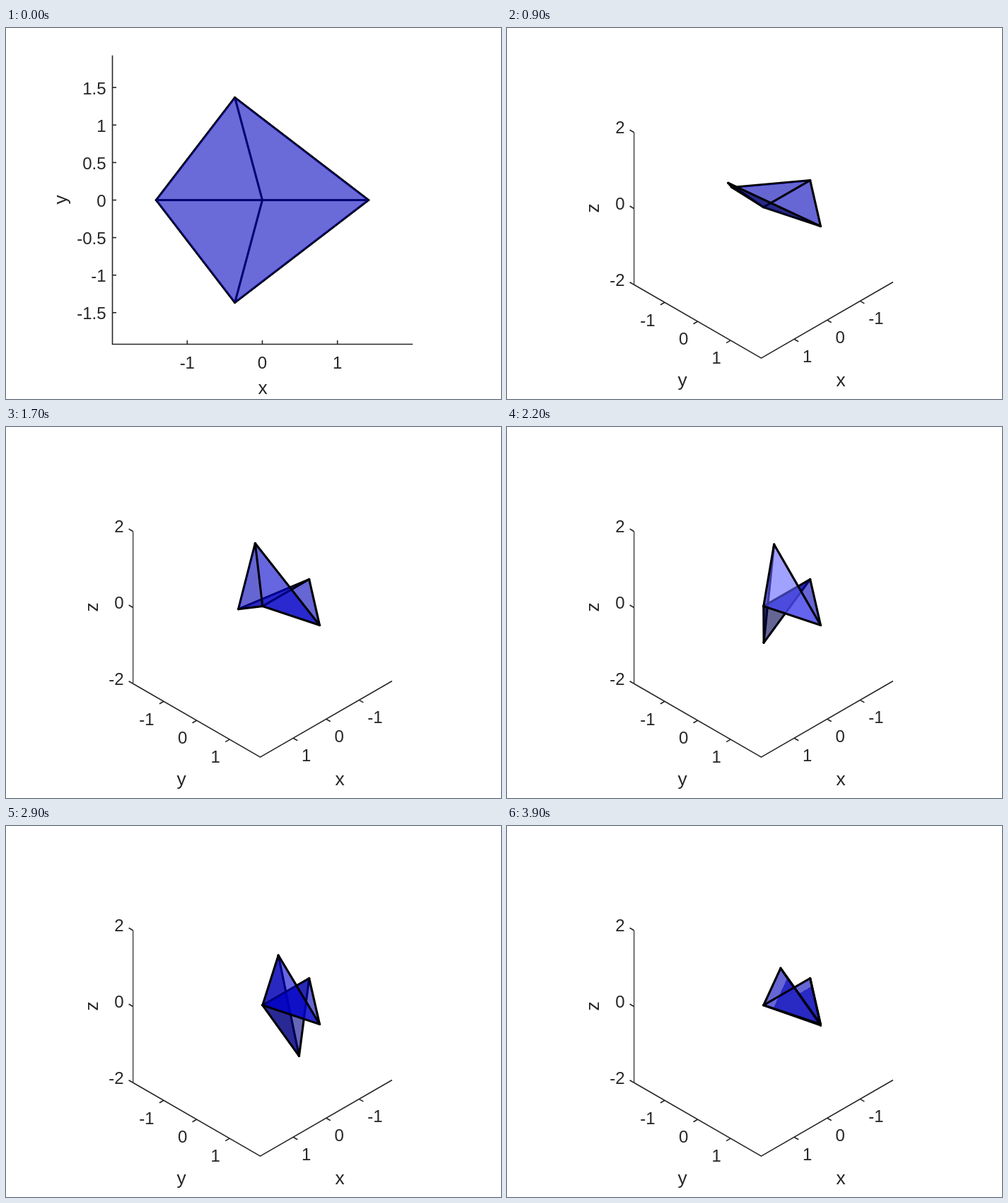
Recreate the animation shown at these times as an HTML page with a canvas. Size 700x525 px, loop 4000 ms.

```html
<!DOCTYPE html>
<html>
<head>
<meta charset="utf-8">
<title>Folding vertex</title>
<style>
  html, body { margin: 0; width: 100%; height: 100%; overflow: hidden; background: #fff; }
  canvas { display: block; }
</style>
</head>
<body>
<canvas id="stage" width="700" height="525"></canvas>
<script>
const ctx = document.getElementById('stage').getContext('2d', { willReadFrequently: true });
const STEPS = 40, STEP_MS = 100;
const RAD = Math.PI / 180;
const INK = '#262626';
const X_LIM = 2, Y_LIM = 1.93, Z_LIM = 2;

const dot = (a, b) => a[0] * b[0] + a[1] * b[1] + a[2] * b[2];
const cross = (a, b) => [
  a[1] * b[2] - a[2] * b[1],
  a[2] * b[0] - a[0] * b[2],
  a[0] * b[1] - a[1] * b[0]
];
const scale = (a, k) => a.map(v => v * k);
const unit = a => scale(a, 1 / Math.hypot(...a));
const clamp = (v, lo, hi) => Math.max(lo, Math.min(hi, v));

const LIGHT = unit([1, 0, 1]);

// edgeBias > 0 lifts outlines towards the viewer, < 0 puts them beneath the faces
const topView = {
  eye: [0, 0, 1],
  edgeBias: -0.02,
  project: ([x, y, z]) => [362.5 + 106.2 * x, 243.5 - 106.2 * y, z]
};
const isoView = {
  eye: unit([1, 1, 1]),
  edgeBias: 0.025,
  project: p => [
    362.8 + 46.6 * (p[1] - p[0]),
    253.6 + 26.9 * (p[0] + p[1]) - 53.9 * p[2],
    dot(p, isoView.eye)
  ]
};

// ---- Folding: four creases of length sqrt(2) meet at the origin ----

const R = Math.SQRT2;
const COS75 = Math.cos(75 * RAD), SIN75 = Math.sin(75 * RAD);

// Flat-foldable vertex: tan(b/2) = cos75 * tan(a/2).
// Picks the pair (a, b) closest to an equal target angle on both creases.
function foldAngles(target) {
  let lo = target, hi = Math.PI - 1e-9, a = target, b = 0;
  for (let i = 0; i < 50; i++) {
    a = (lo + hi) / 2;
    const ta = Math.tan(a / 2), tb = COS75 * ta;
    b = 2 * Math.atan(tb);
    const slope = COS75 * (1 + ta * ta) / (1 + tb * tb);
    if ((a - target) + (b - target) * slope < 0) lo = a; else hi = a;
  }
  return [a, b];
}

function foldedCorners(step) {
  const [a, b] = step ? foldAngles(179 * RAD * step / (STEPS - 1)) : [0, 0];
  const h = R * SIN75;
  const along = -R * COS75;
  const axis = [-COS75, SIN75];
  return [
    [along * axis[0] + h * SIN75 * Math.cos(a),
     along * axis[1] + h * COS75 * Math.cos(a),
     h * Math.sin(a)],
    [-R * COS75, h, 0],
    [-R, 0, 0],
    [-R * COS75, -h * Math.cos(b), -h * Math.sin(b)]
  ];
}

// ---- Shading and per-pixel compositing ----

const FACE_ALPHA = 0.6, MERGE_DEPTH = 0.0082, HALF_LINE = 1.55;

function shade(p, q, eye) {
  let n = unit(cross(p, q));
  if (dot(n, eye) < 0) n = scale(n, -1);
  const d = Math.max(0, dot(n, LIGHT));
  const mirror = n.map((v, i) => 2 * d * v - LIGHT[i]);
  const shine = d > 0 ? 0.9 * Math.max(0, dot(mirror, eye)) ** 10 : 0;
  return [shine, shine, 0.3 + 0.6 * d + shine].map(v => 255 * Math.min(1, v));
}

function makeFace(p, q, view) {
  const o = view.project([0, 0, 0]), s = view.project(p), t = view.project(q);
  const ux = s[0] - o[0], uy = s[1] - o[1], vx = t[0] - o[0], vy = t[1] - o[1];
  const det = ux * vy - uy * vx;
  const color = shade(p, q, view.eye);
  return (x, y) => {
    if (Math.abs(det) < 1e-6) return null;
    const dx = x - o[0], dy = y - o[1];
    const u = (dx * vy - dy * vx) / det, v = (ux * dy - uy * dx) / det;
    if (u < 0 || v < 0 || u + v > 1) return null;
    return { face: true, depth: u * s[2] + v * t[2], color, alpha: FACE_ALPHA };
  };
}

function makeEdge(p, q, view) {
  const s = view.project(p), t = view.project(q);
  const dx = t[0] - s[0], dy = t[1] - s[1], len2 = dx * dx + dy * dy || 1;
  return (x, y) => {
    const k = clamp(((x - s[0]) * dx + (y - s[1]) * dy) / len2, 0, 1);
    const dist = Math.hypot(x - s[0] - k * dx, y - s[1] - k * dy);
    const alpha = clamp(HALF_LINE + 0.5 - dist, 0, 1);
    if (!alpha) return null;
    return { depth: s[2] + k * (t[2] - s[2]) + view.edgeBias, color: [0, 0, 0], alpha };
  };
}

// Front to back; faces that practically coincide count once.
function composite(layers) {
  layers.sort((m, n) => n.depth - m.depth);
  const rgb = [0, 0, 0];
  let through = 1, lastFace = Infinity;
  for (const l of layers) {
    if (l.face) {
      if (lastFace - l.depth < MERGE_DEPTH) continue;
      lastFace = l.depth;
    }
    for (let i = 0; i < 3; i++) rgb[i] += through * l.alpha * l.color[i];
    through *= 1 - l.alpha;
  }
  return rgb.map(v => v + through * 255);
}

function drawSheet(corners, view) {
  const parts = [];
  corners.forEach((p, i) => {
    const q = corners[(i + 1) % 4];
    parts.push(makeFace(p, q, view), makeEdge(p, q, view), makeEdge([0, 0, 0], p, view));
  });
  const pts = [[0, 0, 0], ...corners].map(view.project);
  const xs = pts.map(p => p[0]), ys = pts.map(p => p[1]);
  const x0 = Math.floor(Math.min(...xs)) - 3, y0 = Math.floor(Math.min(...ys)) - 3;
  const w = Math.ceil(Math.max(...xs)) + 3 - x0, h = Math.ceil(Math.max(...ys)) + 3 - y0;
  const img = ctx.getImageData(x0, y0, w, h);
  for (let y = 0; y < h; y++) {
    for (let x = 0; x < w; x++) {
      const layers = [];
      for (const part of parts) {
        const l = part(x0 + x + 0.5, y0 + y + 0.5);
        if (l) layers.push(l);
      }
      if (layers.length) img.data.set(composite(layers), 4 * (y * w + x));
    }
  }
  ctx.putImageData(img, x0, y0);
}

// ---- Axes ----

function line(...pts) {
  ctx.beginPath();
  pts.forEach(p => ctx.lineTo(p[0], p[1]));
  ctx.stroke();
}

function label(str, x, y, { size = 24, align = 'center', turned = false } = {}) {
  ctx.save();
  ctx.translate(x, y);
  if (turned) ctx.rotate(-Math.PI / 2);
  ctx.font = size + 'px "Liberation Sans", Arial, sans-serif';
  ctx.textAlign = align;
  ctx.fillText(str, 0, 0);
  ctx.restore();
}

const NAME = { size: 26.4 };
const TURNED = { size: 26.4, turned: true };

function drawFlatAxes() {
  ctx.lineWidth = 1.6;
  line([150.5, 38.8], [150.5, 447.5], [575.2, 447.5]);
  for (let v = -1.5; v <= 1.5; v += 0.5) {
    const y = topView.project([0, v, 0])[1];
    line([150.5, y], [156, y]);
    label(String(v), 141.5, y + 9.5, { align: 'right' });
  }
  for (let v = -1; v <= 1; v++) {
    const x = topView.project([v, 0, 0])[0];
    line([x, 447.5], [x, 442]);
    label(String(v), x, 482);
  }
  label('x', 363, 518, NAME);
  label('y', 86, 243, TURNED);
}

function drawSpaceAxes() {
  const at = (x, y, z) => isoView.project([x, y, z]);
  const TICK = 0.13;
  ctx.lineWidth = 1.2;
  line(at(X_LIM, -Y_LIM, Z_LIM), at(X_LIM, -Y_LIM, -Z_LIM));
  ctx.lineWidth = 1.6;
  line(at(X_LIM, -Y_LIM, -Z_LIM), at(X_LIM, Y_LIM, -Z_LIM), at(-X_LIM, Y_LIM, -Z_LIM));
  for (let v = -1; v <= 1; v++) {
    const onX = at(v, Y_LIM, -Z_LIM), onY = at(X_LIM, v, -Z_LIM), onZ = at(X_LIM, -Y_LIM, 2 * v);
    line(onX, at(v, Y_LIM + TICK, -Z_LIM));
    line(onY, at(X_LIM + TICK, v, -Z_LIM));
    line(onZ, at(X_LIM, -Y_LIM - TICK, 2 * v));
    const minus = v < 0 ? 4 : 0;
    label(String(v), onX[0] + 18.5 + minus, onX[1] + 32.7);
    label(String(v), onY[0] - 20 - minus, onY[1] + 33.2);
    label(String(2 * v), 166.5, onZ[1] + 1.7, { align: 'right' });
  }
  label('x', 472, 507, NAME);
  label('y', 248, 507, NAME);
  label('z', 130, 255, TURNED);
}

// ---- Playback ----

function draw(step) {
  ctx.fillStyle = '#fff';
  ctx.fillRect(0, 0, 700, 525);
  ctx.fillStyle = ctx.strokeStyle = INK;
  if (step) drawSpaceAxes(); else drawFlatAxes();
  drawSheet(foldedCorners(step), step ? isoView : topView);
}

let shown = -1;
const start = performance.now();

function tick() {
  const step = Math.floor((performance.now() - start) / STEP_MS) % STEPS;
  if (step !== shown) draw(shown = step);
  requestAnimationFrame(tick);
}
tick();
</script>
</body>
</html>
```
